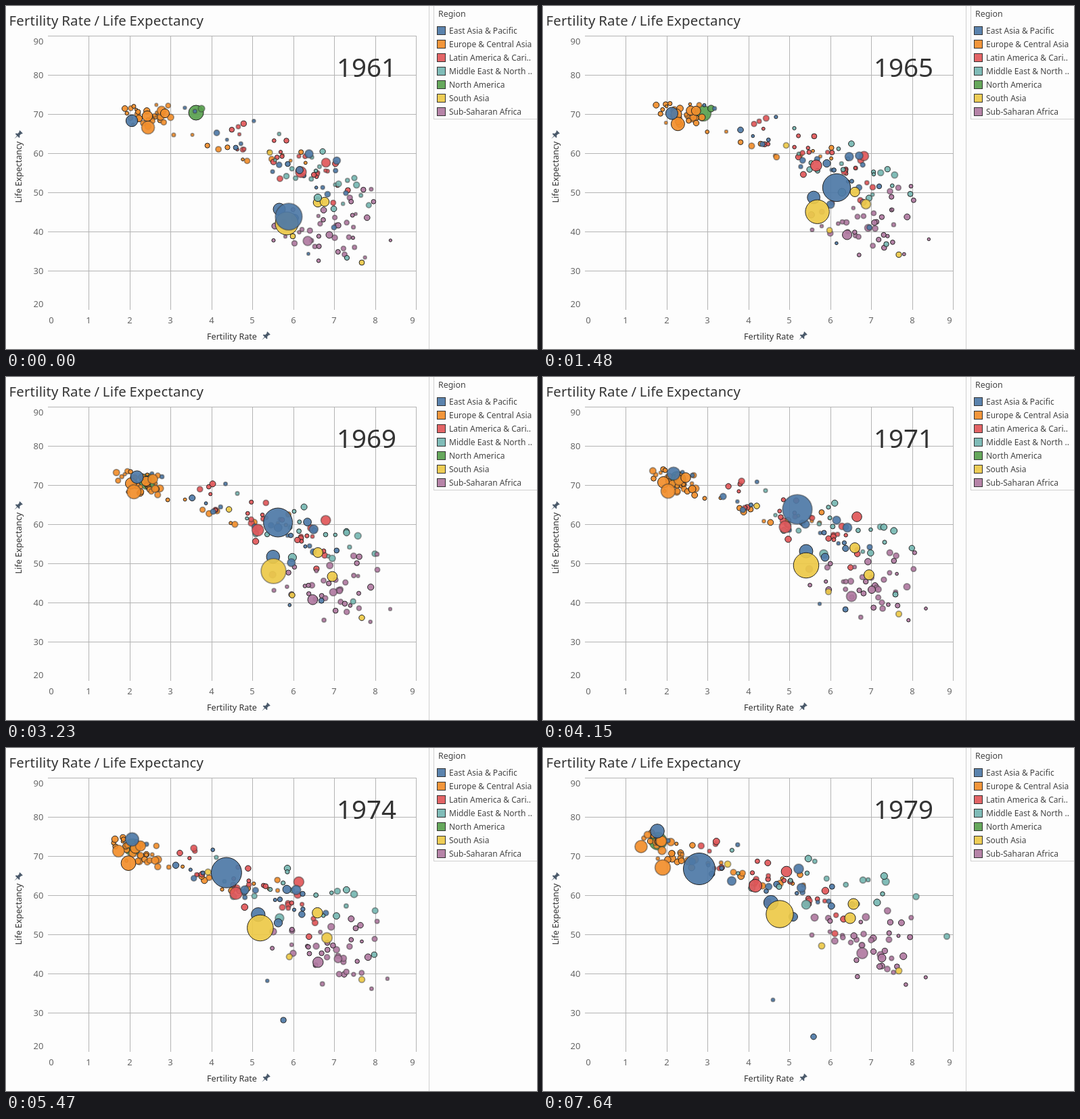
These frames come from a looping animation (785x508 px, 8000 ms). An HTML page:

```html
<!DOCTYPE html>
<html lang="en">
<head>
<meta charset="utf-8">
<title>Fertility Rate / Life Expectancy</title>
<style>
html, body { margin: 0; width: 100%; height: 100%; overflow: hidden; background: #fdfdfd; }
svg { display: block; font: 12px "Noto Sans", "Open Sans", sans-serif; fill: #444; }
.title { font-size: 20.4px; letter-spacing: .2px; word-spacing: -1px; fill: #333; }
.axis { font-size: 12.6px; fill: #333; text-anchor: middle; }
.tick { font-size: 13px; fill: #666; text-anchor: middle; }
#year { font-size: 38.5px; fill: #333; text-anchor: middle; }
</style>
</head>
<body>
<svg width="785" height="508" viewBox="0 0 785 508">
  <defs>
    <clipPath id="plot"><rect x="62" y="44" width="545" height="406"/></clipPath>
    <path id="pin" fill="#4b5a6b" transform="rotate(45)" d="M-3-6.5H3V-5L2-4.5V-1L4 .5V2H.6L0 8L-.6 2H-4V.5L-2-1V-4.5L-3-5Z"/>
  </defs>
  <g id="frame"></g>
  <text class="title" x="4.5" y="29">Fertility Rate / Life Expectancy</text>
  <text class="axis" x="334" y="494">Fertility Rate</text>
  <text class="axis" transform="translate(23 246) rotate(-90)">Life Expectancy</text>
  <use href="#pin" transform="translate(384 489)"/>
  <use href="#pin" transform="translate(18 191)"/>
  <text x="639" y="16" font-size="12.4">Region</text>
  <text id="year" x="533" y="105"></text>
  <g id="dots" clip-path="url(#plot)" fill-opacity=".92"></g>
</svg>
<script>
const byId = id => document.getElementById(id);
const BLUE = '#4e79a7', ORANGE = '#f28e2b', RED = '#e15759', TEAL = '#76b7b2',
  GREEN = '#59a14f', YELLOW = '#edc948', PURPLE = '#b07aa1';

// Axes, grid and legend
const rect = (x, y, w, h, fill, more = '') =>
  `<rect x="${x}" y="${y}" width="${w}" height="${h}" fill="${fill}" ${more}/>`;
const tick = (x, y, n) => `<text class="tick" x="${x}" y="${y}">${n}</text>`;
let art = rect(625, 0, 1, 508, '#d0d0d0') + rect(632, 0, 1, 168, '#d0d0d0') + rect(632, 167, 153, 1, '#d0d0d0');
for (let i = 0; i < 8; i++) {
  const y = 44 + 58 * i;
  if (i < 7) art += rect(62, y, 545, 1, '#b4b4b4');
  art += tick(48, i == 0 ? 57 : i == 7 ? 446 : y + 5, 90 - 10 * i);
}
for (let i = 0; i < 10; i++) {
  const x = Math.round(62 + 60.45 * i);
  if (i) art += rect(x, 44, 1, 406, '#b4b4b4');
  art += tick(i == 0 ? 67 : i == 9 ? 601 : x, 470, i);
}
[[BLUE, 'East Asia &amp; Pacific'], [ORANGE, 'Europe &amp; Central Asia'],
 [RED, 'Latin America &amp; Cari..'], [TEAL, 'Middle East &amp; North ..'],
 [GREEN, 'North America'], [YELLOW, 'South Asia'], [PURPLE, 'Sub-Saharan Africa']
].forEach(([color, name], i) => {
  art += rect(637.5, 30.5 + 20 * i, 12, 12, color, 'stroke="#333" fill-opacity=".92"') +
    `<text x="655" y="${41 + 20 * i}">${name}</text>`;
});
byId('frame').innerHTML = art;

// Seeded random numbers
let seed = 7;
function random() {
  seed = seed + 0x6D2B79F5 | 0;
  let n = Math.imul(seed ^ seed >>> 15, 1 | seed);
  n = n + Math.imul(n ^ n >>> 7, 61 | n) ^ n;
  return ((n ^ n >>> 14) >>> 0) / 2 ** 32;
}
const mix = (a, b, u) => a + (b - a) * u;

// Every bubble has a colour, a radius and a place at(t), t in years since 1961
const LAST = 18;
const bubbles = [];

// Small countries lie scattered along a line that moves from one year's ends to another's
function cloud(color, count, from, to, spread, maxR = 4.2) {
  for (let i = 0; i < count; i++) {
    const along = (i + random()) / count;
    const scatter = () => (random() + random() - 1) * 2 * spread;
    const dx = scatter(), dy = scatter(), phase = random() * 6.28;
    const end = (line, axis) => mix(line[axis], line[axis + 2], along);
    bubbles.push({
      color,
      r: mix(2.1, maxR, random()),
      at: t => {
        const u = t / LAST, wave = 4 * Math.sin(phase + 5 * u);
        return [mix(end(from, 0), end(to, 0), u) + dx + wave, mix(end(from, 1), end(to, 1), u) + dy];
      }
    });
  }
}

// Large countries follow a smooth curve through a few x, y points
const KEYS = { 3: [0, 10, LAST], 4: [0, 4, 10, LAST] };
function curve(p, axis, t) {
  const k = KEYS[p.length / 2], last = k.length - 1, v = i => p[2 * i + axis];
  let i = 0;
  while (i < last - 1 && t >= k[i + 1]) i++;
  const slope = j => {
    const a = Math.max(j - 1, 0), b = Math.min(j + 1, last);
    return (v(b) - v(a)) / (k[b] - k[a]);
  };
  const d = k[i + 1] - k[i], u = (t - k[i]) / d, w = 1 - u;
  return w * w * (1 + 2 * u) * v(i) + u * u * (3 - 2 * u) * v(i + 1) +
    d * u * w * (w * slope(i) - u * slope(i + 1));
}
const country = (color, r, ...p) =>
  bubbles.push({ color, r, at: t => [curve(p, 0, t), curve(p, 1, t)] });

country(GREEN, 11, 281,158, 237,159, 199,152, 170,138);
country(GREEN, 4.8, 289,152, 194,150, 165,135);

cloud(ORANGE, 27, [181,162, 236,161], [154,134, 218,166], 9, 5);
cloud(ORANGE, 12, [240,178, 468,238], [236,158, 402,208], 13);
cloud(RED, 27, [325,186, 512,262], [228,147, 456,246], 19, 4.4);
cloud(BLUE, 17, [280,158, 512,285], [178,142, 472,238], 18);
cloud(TEAL, 19, [412,210, 528,290], [285,172, 552,214], 22, 4.6);
cloud(PURPLE, 40, [415,352, 538,306], [422,277, 540,301], 30, 4.5);

country(YELLOW, 3.9, 390,217, 316,191, 273,172);
country(YELLOW, 3.9, 424,341, 422,318, 412,293);
country(YELLOW, 3.9, 526,380, 526,351, 526,330);
country(YELLOW, 6.8, 461,291, 461,253, 459,231);
country(YELLOW, 6.8, 471,290, 482,293, 454,252);
country(PURPLE, 5, 478,339, 486,315, 501,311);
country(PURPLE, 6.8, 446,348, 456,325, 472,304);
country(TEAL, 5.6, 461,284, 415,262, 389,232);
country(TEAL, 3.6, 504,373, 521,322, 597,279);
country(RED, 6.6, 473,232, 464,207, 360,183);
country(RED, 8, 436,246, 358,222, 314,204);
country(ORANGE, 6.6, 230,155, 201,153, 174,138);
country(ORANGE, 6.6, 235,159, 211,149, 175,138);
country(ORANGE, 7.7, 209,163, 178,156, 145,146);
country(ORANGE, 9.6, 210,180, 185,169, 177,177);
country(BLUE, 5.4, 489,229, 434,212, 382,207);
country(BLUE, 5.4, 434,243, 388,218, 279,197);
country(BLUE, 5.4, 427,314, 417,267, 370,250);
country(BLUE, 6, 448,219, 450,223, 378,179);
country(BLUE, 8.7, 186,170, 193,143, 169,123);
country(BLUE, 9, 404,301, 389,258, 337,229);
country(YELLOW, 17, 415,322, 389,279, 350,246);
country(BLUE, 2.2, 447,367, 409,336, 340,373);
country(BLUE, 19.8, 418,312, 434,269, 376,196, 231,179);

// One country's life expectancy collapses and starts to recover
const bell = (t, width) => Math.exp(-(((t - 16) / width) ** 2));
bubbles.push({ color: BLUE, r: 3.6, at: t => [485 - 94 * bell(t, 6.3), 328 + 125 * bell(t, 4.2)] });

const noise = (i, t) => Math.abs(Math.sin(i * 12.9898 + t * 78.233) * 43758.5453) % 1;

function draw(t) {
  byId('year').textContent = 1961 + t;
  byId('dots').innerHTML = bubbles.map(({ color, r, at }, i) => {
    const [x, y] = at(t).map(n => n.toFixed(1));
    const line = noise(i, t) < .5 ? 'stroke="#222"' : 'stroke="#333" stroke-opacity=".45" stroke-width="1.8"';
    return `<circle cx="${x}" cy="${y}" r="${(r * (1 + t * .0104)).toFixed(2)}" fill="${color}" ${line}/>`;
  }).join('');
}

// The year steps at these times, in ms
const STEPS = [190, 640, 1040, 1480, 1960, 2400, 2810, 3230, 3670, 4150,
  4590, 5030, 5470, 5920, 6290, 6730, 7150, 7640];
const start = performance.now();
let shown = -1;
function run() {
  const ms = (performance.now() - start) % 8000;
  const t = STEPS.filter(s => s <= ms).length;
  if (t != shown) draw(shown = t);
  requestAnimationFrame(run);
}
run();
</script>
</body>
</html>
```
